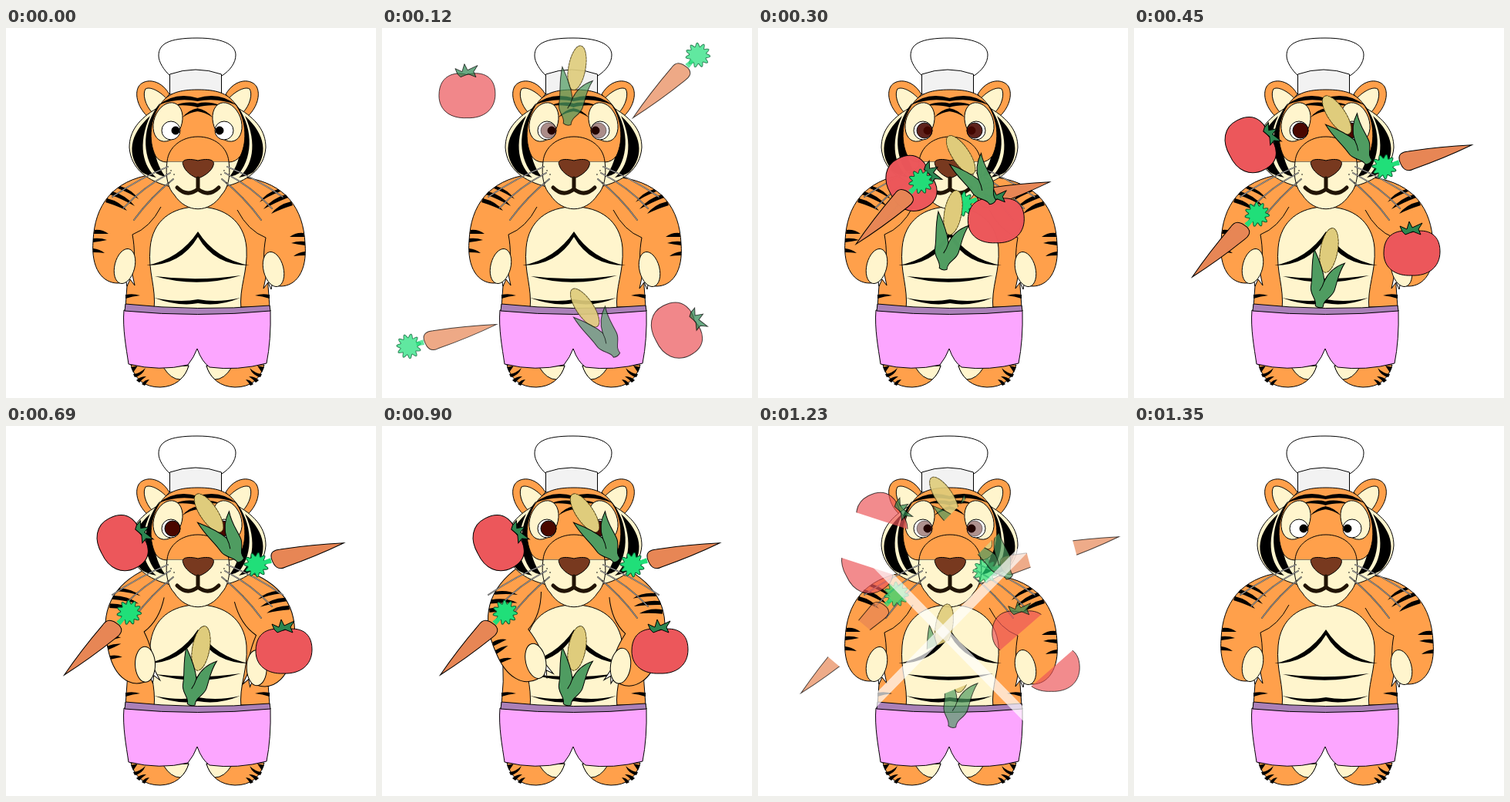
Animation, 480 px wide and 480 px high, one loop 1830 ms. Source, as an HTML page with a canvas:

```html
<!DOCTYPE html>
<html>
<head>
<meta charset="utf-8">
<title>Tiger chef</title>
<style>
html, body { margin: 0; overflow: hidden; background: #fff; }
canvas { display: block; }
</style>
</head>
<body>
<canvas id="stage" width="480" height="480"></canvas>
<script>
const ctx = document.getElementById('stage').getContext('2d');
const LOOP = 1830, STEP = 30;
const ORANGE = '#ffa04b', CREAM = '#fff5cd', BLACK = '#000';

const clamp = v => Math.max(0, Math.min(1, v));
const span = (t, a, b) => clamp((t - a) / (b - a));

function shape(d, fill, stroke = BLACK, width = 1) {
  const path = new Path2D(d);
  if (fill) { ctx.fillStyle = fill; ctx.fill(path); }
  if (stroke) { ctx.strokeStyle = stroke; ctx.lineWidth = width; ctx.stroke(path); }
}
function oval(x, y, rx, ry, angle, fill, stroke = BLACK) {
  ctx.beginPath();
  ctx.ellipse(x, y, rx, ry, angle * Math.PI / 180, 0, 7);
  ctx.fillStyle = fill;
  ctx.fill();
  ctx.strokeStyle = stroke;
  ctx.lineWidth = 1;
  ctx.stroke();
}
const ink = d => shape(d, BLACK, null);

function scoped(draw) { ctx.save(); draw(); ctx.restore(); }
function rotate(deg) { ctx.rotate(deg * Math.PI / 180); }

// Draws the left half and its mirror image.
function both(draw) {
  scoped(() => draw(false));
  scoped(() => { ctx.translate(497, 0); ctx.scale(-1, 1); draw(true); });
}

function drawBody() {
  both(() => {
    shape('M162 437Q170 466 200 466Q228 465 237 438Z', ORANGE);
    shape('M204 440Q214 456 226 456Q234 449 237 438Z', CREAM);
    ink('M162 440L171 438Q167 444 165 447ZM165 449Q174 448 181 441Q177 451 167 453ZM169 457Q174 452 182 452Q176 456 173 460ZM176 462Q180 456 186 456Q182 460 180 464Z');
  });
  shape('M190 190Q150 208 148 250Q162 300 155 362H342Q335 300 349 250Q347 208 307 190Z', ORANGE);
  shape('M192 366C195 335 184 318 187 285C190 250 215 232 249 232C283 232 309 250 312 285C314 318 302 335 305 366Z', CREAM);
  ink('M182 308Q225 300 249 264Q272 300 316 308Q270 308 249 271Q227 308 182 308Z');
  ink('M193 322Q249 329 305 321Q249 338 193 322Z');
  ink('M192 350Q225 357 249 352Q275 357 304 350Q275 362 249 357Q225 362 192 350Z');
  both(() => ink('M155 346Q165 344 174 347Q164 348 155 351Z'));
  shape('M153 366C151 390 156 415 159 436Q200 446 236 437Q244 427 248 416Q254 433 264 440Q300 445 338 435Q344 405 343 366Z', '#fca6ff');
  shape('M155 358Q249 368 342 360L343 367Q249 376 154 367Z', '#aa80b8');
}

function drawArm(angle) {
  ctx.translate(168, 212);
  rotate(-angle);
  ctx.translate(-168, -212);
  shape('M154 318L157 335L161 326L167 334L163 315Z', '#fff');
  shape('M190 190C138 198 115 230 113 276C110 312 125 331 145 331C162 331 171 306 164 268Q187 259 201 232', ORANGE);
  oval(154, 309, 13, 23, 14, CREAM);
  ink('M131 221Q148 225 157 237Q145 231 129 226ZM138 212Q156 217 167 231Q153 223 135 216ZM148 205Q164 210 172 222Q161 214 145 208Z');
  ink('M115 262Q125 261 133 267Q124 267 114 267ZM113 273Q123 272 131 275Q122 277 113 278ZM113 286Q122 287 128 292Q121 291 113 291Z');
}

function drawHead(glare) {
  both(() => {
    shape('M185 116C172 105 166 87 172 76C178 66 199 64 212 86Z', ORANGE);
    shape('M190 110C180 100 177 85 181 79C188 75 203 84 212 96Z', CREAM);
  });
  shape('M213 62C205 55 198 44 198 36C198 21 210 13 248 13C286 13 298 24 298 35C298 45 291 55 280 62Z', '#fff');
  shape('M212.500 60Q246 48 279.500 60V86H212.500Z', '#f2f2f2');

  both(() => {
    shape('M196 104C172 118 160 134 160 155C162 183 184 199 214 206L249 160Z', CREAM);
    ink('M187 114C160 138 156 165 176 187Q184 192 195 194C178 180 170 151 187 114Z');
    ink('M200 97C176 126 176 165 194 188Q200 192 207 193C189 170 186 130 200 97Z');
  });
  shape('M209 174Q199 174 194 166C184 146 187 116 201 98C211 84 226 80 249 80C272 80 287 84 297 98C311 116 314 146 304 166Q298 174 289 174Z', ORANGE);
  both(() => {
    ink('M198 100Q220 82 249 91V95Q222 90 198 100Z');
    ink('M217 101Q235 94 249 98V103Q236 99 217 101Z');
    ink('M229 116Q237 106 249 104V108Q239 109 229 116Z');
    oval(210, 122, 18, 26, 20, CREAM);
    oval(214, 133, 12, 12, 0, '#fff');
    oval(220, 133, 5, 5, 0, BLACK);
    ctx.globalAlpha = glare;
    oval(216, 133, 10, 10, 0, '#4a0700');
  });
  shape('M209 173C206 194 211 209 218 216C234 241 264 241 280 216C287 209 292 194 289 173Z', CREAM);
  shape('M209 173C211 154 228 141 249 141C270 141 287 154 289 173', ORANGE);
  shape('M230 178C226 170 238 169 249 172C260 169 272 170 269 178C267 186 256 193 249 195C242 193 232 186 230 178Z', '#78391f');
  ctx.lineCap = 'round';
  shape('M249 195V208M222 207Q235 220 249 209Q263 220 276 207', null, '#211405', 5);
  both(() => {
    const whiskers = 'M210 180Q175 194 138 219M213 188Q178 206 152 234M217 196Q188 219 166 249';
    shape(whiskers, null, '#333', 1.8);
    shape(whiskers, null, '#ccc', .8);
    shape('M214 185h.1M211 201h.1M218 190h.1', null, BLACK, 1.5);
  });
  ctx.lineCap = 'butt';
}

function tomato() {
  shape('M0 -27C-10 -31 -36 -30 -36 0C-36 20 -20 30 0 29C22 30 37 18 37 -2C37 -28 16 -32 0 -27Z', '#ec575b');
  shape('M-15 -35L-6 -31L-3 -41L1 -33L14 -39L9 -31L12 -24L2 -28L-8 -24L-12 -28Z', '#2c8650');
}

function carrot() {
  shape('M-37 -3C-37 -12 -30 -13 -23 -12Q20 -8 59 0Q20 8 -22 12C-31 14 -36 10 -37 -3Z', '#e78655');
  ctx.beginPath();
  for (let i = 0; i <= 90; i++) {
    const a = i * Math.PI / 45, r = 13.5 + 2.5 * Math.cos(a * 11);
    ctx.lineTo(-58 + r * Math.cos(a), r * Math.sin(a));
  }
  ctx.fillStyle = '#20df79';
  ctx.fill();
  ctx.strokeStyle = '#075c30';
  ctx.stroke();
  shape('M-48 -3L-38 -4V3L-48 2Z', '#20df79', null);
}

function corn() {
  oval(0, -23, 11, 29, 0, '#dfcc7c');
  ctx.setLineDash([2, 2]);
  oval(0, -23, 11, 29, 0, '#dfcc7c', '#786522');
  ctx.setLineDash([]);
  shape('M-5 51C-4 42 -15 38 -15 27C-15 12 -20 0 -19 -21C-10 -8 -2 6 1 17C4 6 12 -4 23 -10C17 4 18 14 16 27C14 38 4 40 5 51Q0 54 -5 51Z', '#4f9c61');
  shape('M1 17Q0 25 -3 31');
}

// Resting place, tilt, entry offset and cut angle.
const food = [
  { draw: carrot, x: 381, y: 166, tilt: -14, from: [-539, 433], cut: 75 },
  { draw: tomato, x: 150, y: 152, tilt: 63, from: [430, 447], cut: 18 },
  { draw: tomato, x: 360, y: 292, tilt: 0, from: [-465, -380], cut: -41 },
  { draw: carrot, x: 118, y: 282, tilt: 136, from: [465, -384], cut: 40 },
  { draw: corn, x: 249, y: 311, tilt: 10, from: [0, -440], cut: -22 },
  { draw: corn, x: 276, y: 132, tilt: -34, from: [0, 465], cut: -45 }
];

function drawFood(item, away, split) {
  const sides = split > 0 ? [-1, 1] : [0];
  for (const side of sides) scoped(() => {
    ctx.translate(item.x + item.from[0] * away, item.y + item.from[1] * away);
    rotate(item.cut);
    ctx.translate(0, side * split);
    if (side) {
      ctx.beginPath();
      ctx.rect(-150, side < 0 ? -150 : 0, 300, 150);
      ctx.clip();
    }
    rotate(item.tilt - item.cut);
    item.draw();
  });
}

function drawSlash(grow) {
  ctx.strokeStyle = '#fff';
  ctx.lineWidth = 13;
  for (const side of [-1, 1]) {
    ctx.beginPath();
    ctx.moveTo(240 + side * 180, 83);
    ctx.lineTo(240 + side * (180 - 360 * grow), 83 + 368 * grow);
    ctx.stroke();
  }
}

function render(t) {
  const away = (1 - span(t, 0, 450)) ** 2;
  const windUp = 1 - (1 - span(t, 540, 990)) ** 2;
  const swing = span(t, 990, 1080);
  const leave = span(t, 1080, 1350);

  ctx.globalAlpha = 1;
  ctx.fillStyle = '#fff';
  ctx.fillRect(0, 0, 480, 480);
  drawBody();
  both(mirrored => {
    if (mirrored) ctx.translate(-4, 4);
    drawArm((mirrored ? 23 : 28) * windUp * (1 - swing));
  });
  drawHead(Math.min(1 - away, 1 - leave));

  if (leave === 1) return;
  ctx.globalAlpha = (1 - away ** 2) * (1 - leave ** 2);
  for (const item of food) drawFood(item, away, 180 * leave ** 3);
  if (swing > 0) drawSlash(swing);
}

const start = performance.now();
function tick() {
  const t = (performance.now() - start) % LOOP;
  render(Math.floor(t / STEP) * STEP);
  requestAnimationFrame(tick);
}
tick();
</script>
</body>
</html>
```
